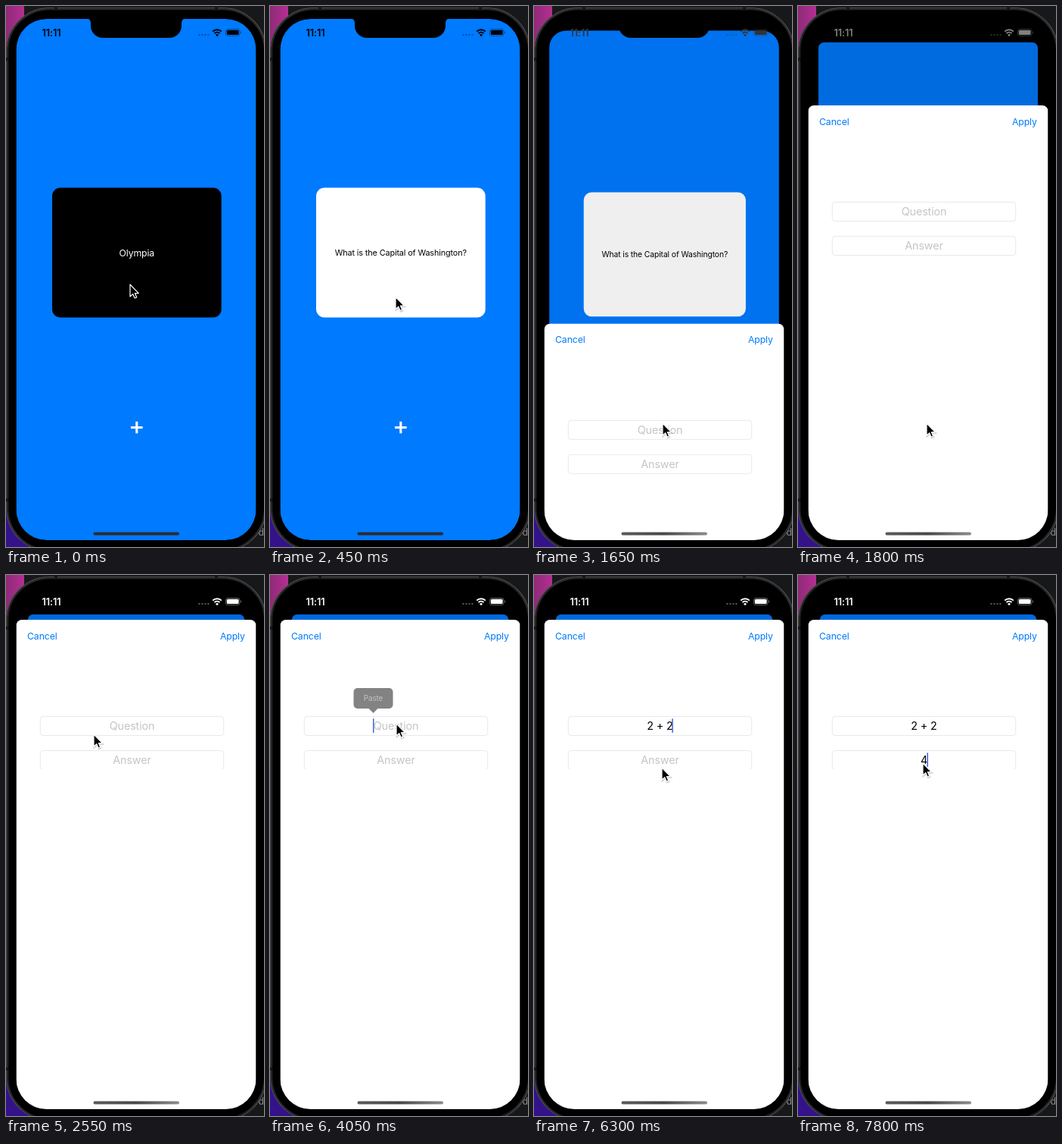
Write an HTML page that moves like this. It is 341 px wide and 713 px high and loops after 8000 ms.

```html
<!DOCTYPE html>
<html lang="en">
<head>
<meta charset="utf-8">
<title>Flash card app</title>
<style>
  html, body { margin: 0; width: 100%; height: 100%; overflow: hidden; background: #17181a; }
  svg { display: block; width: 100vw; height: 100vh; }
  text { font-family: Inter, Roboto, sans-serif; letter-spacing: -.01em; white-space: pre; }
  .mid { text-anchor: middle; }
  .nav { font-size: 12.3px; fill: #007aff; }
  .input { font-size: 14.4px; text-anchor: middle; }
  .field { fill: #fff; stroke: #e4e4e5; stroke-width: .8; }
  .caret { fill: #3f62dd; }
</style>
</head>
<body>
<svg viewBox="0 0 341 713" preserveAspectRatio="none">
  <defs>
    <clipPath id="screen"><rect x="13.5" y="17" width="317" height="687" rx="40"/></clipPath>
    <linearGradient id="magenta" x2="1" y2="0">
      <stop stop-color="#8f2a78"/><stop offset="1" stop-color="#b52f92"/>
    </linearGradient>
    <linearGradient id="barLight">
      <stop stop-color="#5a5a5a"/><stop offset=".5" stop-color="#484848"/><stop offset="1" stop-color="#8c8c8c"/>
    </linearGradient>
    <path id="arrow" d="M0 0V16L3.7 12.6 6.1 18 8.7 16.9 6.4 11.6H11.3Z"/>
  </defs>

  <!-- desktop -->
  <rect width="341" height="713" fill="#17181a"/>
  <rect width="24" height="90" fill="url(#magenta)"/>
  <rect y="630" width="60" height="83" fill="#34128a"/>
  <text x="333.5" y="698" font-size="12.5" fill="#8b8b8d">d</text>

  <!-- phone body -->
  <rect x=".6" y="2.6" width="343" height="716" rx="57" fill="#000" stroke="#4d4d4f" stroke-width="1.3"/>
  <rect x="2.4" y="4.4" width="339.4" height="712.4" rx="55" fill="none" stroke="#2b2b2c" stroke-width="1.6"/>
  <path d="M0 70h3M0 651h3M66 2v4M278 2v4" stroke="#161617" stroke-width="4"/>

  <g clip-path="url(#screen)">
    <g id="view">
      <rect class="page" x="13.5" y="17" width="317" height="687" fill="#007aff"/>
      <rect id="card" x="61" y="239.5" width="223.7" height="171" rx="11"/>
      <text id="cardText" class="mid" x="172.8"></text>
      <path d="M165 555.5h15.6M172.8 547.7v15.6" stroke="#fff" stroke-width="3.1"/>
      <rect id="dim" class="page" x="13.5" y="17" width="317" height="687"/>
    </g>
    <g id="sheet">
      <rect x="13.5" width="317" height="720" rx="7.5" fill="#fff"/>
      <text class="nav" x="28" y="25.5">Cancel</text>
      <text class="nav" x="315.8" y="25.5" text-anchor="end">Apply</text>
      <rect class="field" x="45.3" y="127.5" width="242.4" height="25" rx="3.7"/>
      <rect class="field" x="45.3" y="172.5" width="242.4" height="25" rx="3.7"/>
      <rect id="cover" x="44" y="197" width="246" height="2" fill="#fff"/>
      <text id="question" class="input" x="166.5" y="145.2"></text>
      <text id="answer" class="input" x="166.5" y="190.2"></text>
      <rect id="questionCaret" class="caret" y="130.3" width="1.5" height="18.6"/>
      <rect id="answerCaret" class="caret" y="175.3" width="1.5" height="18.6"/>
      <g id="paste">
        <path d="M115.5 90h42a5 5 0 0 1 5 5v17a5 5 0 0 1-5 5h-15l-6 6-6-6h-15a5 5 0 0 1-5-5V95a5 5 0 0 1 5-5z" fill="#262626"/>
        <text class="mid" x="136.5" y="107" font-size="9.9" fill="#fff" opacity=".5">Paste</text>
      </g>
    </g>
    <rect id="homeBar" x="115.5" y="693.6" width="113.5" height="4" rx="2"/>
  </g>

  <path d="M106 16.5q6 0 6 6v3.500a16 16 0 0 0 16 16h88a16 16 0 0 0 16-16v-3.500q0-6 6-6z" fill="#000"/>

  <g id="status">
    <text class="mid" x="60" y="39.5" font-size="12.7" font-weight="600">11:11</text>
    <path d="M255.400 38h.01M259.400 38h.01M263.400 38h.01M267.400 38h.01" stroke="currentColor" stroke-width="2.4" stroke-linecap="round" opacity=".32"/>
    <path d="M273.200 33.600a8.200 8.200 0 0 1 11.600 0M275.400 36.200a5.100 5.100 0 0 1 7.200 0" fill="none" stroke="currentColor" stroke-width="1.9"/>
    <path d="M277 38l2 2.200 2-2.200a2.800 2.800 0 0 0-4 0z"/>
    <rect x="290.400" y="30.400" width="18.600" height="9" rx="2.700" fill="none" stroke="currentColor" stroke-width=".8" opacity=".45"/>
    <rect x="291.800" y="31.800" width="15.800" height="6.200" rx="1.500"/>
    <path d="M310 33.300a2 2 0 0 1 0 3.200z" opacity=".5"/>
  </g>

  <g id="cursor">
    <use href="#arrow" x=".6" y="1.200" stroke="#000" stroke-width="2" opacity=".18"/>
    <use href="#arrow" stroke="#fff" stroke-width="1.200" stroke-linejoin="round"/>
  </g>
</svg>

<script>
const LOOP = 8000, STEP = 150;
const $ = id => document.getElementById(id);
const clamp = v => Math.max(0, Math.min(1, v));
const set = (el, attrs) => { for (const k in attrs) el.setAttribute(k, attrs[k]); };

// time, x, y of the pointer tip
const pointer = [
  [300, 164, 367], [600, 168, 400], [900, 177, 500], [1200, 177, 556], [1350, 170, 550],
  [1800, 170, 550], [2100, 145, 400], [2400, 116, 236], [2550, 116, 210], [2700, 114, 200],
  [2850, 118, 198], [3150, 118, 198], [3300, 130, 197], [3450, 155, 193], [3600, 167, 196],
  [6150, 167, 196], [6300, 169, 254], [6450, 170, 308], [6600, 170, 288], [6750, 168, 256],
  [6900, 165, 248]
];

// time, text, caret x (0 hides it)
const questionSteps = [
  [0, "", 0], [3750, "", 136], [4350, "2", 171], [4800, "2", 174], [5100, "2 +", 176.7],
  [5550, "2 +", 180.7], [5850, "2 + 2", 182.3], [6900, "2 + 2", 0]
];
const answerSteps = [[0, "", 0], [7050, "", 140.800], [7650, "4", 170.500]];

function along(points, t) {
  const i = points.findIndex(p => p[0] > t);
  if (i < 0) return points[points.length - 1].slice(1);
  if (i === 0) return points[0].slice(1);
  const a = points[i - 1], b = points[i], k = (t - a[0]) / (b[0] - a[0]);
  return [a[1] + (b[1] - a[1]) * k, a[2] + (b[2] - a[2]) * k];
}

// critically damped spring
function spring(t, start, speed) {
  const w = Math.max(0, t - start) / 1000 * speed;
  return t >= start + 850 ? 1 : 1 - (1 + w) * Math.exp(-w);
}

function drawField(id, placeholder, steps, t) {
  const [, value, caret] = steps.filter(s => s[0] <= t).pop();
  $(id).textContent = value || placeholder;
  set($(id), { fill: value ? "#000" : "#c5c5c7" });
  set($(id + "Caret"), { x: caret, opacity: caret ? 1 : 0 });
}

function drawCard(flipped) {
  set($("card"), { fill: flipped ? "#fff" : "#000" });
  $("cardText").textContent = flipped ? "What is the Capital of Washington?" : "Olympia";
  set($("cardText"), {
    fill: flipped ? "#000" : "#fff",
    "font-size": flipped ? 10.8 : 12.3,
    y: flipped ? 329 : 329.5
  });
}

function draw(t) {
  drawCard(t >= 150);

  const p = spring(t, 1550, 15), scale = 1 - .096 * p;
  set($("view"), { transform: `translate(172 ${17 + 35 * p}) scale(${scale}) translate(-172 -17)` });
  document.querySelectorAll(".page").forEach(el => set(el, { rx: Math.max(8, 40 - 38 * p) }));
  set($("dim"), { opacity: .14 * p });
  set($("sheet"), { transform: `translate(0 ${59 + 645 * (1 - p)})` });
  set($("cover"), { opacity: p === 1 ? 1 : 0 });
  set($("homeBar"), { fill: p > .1 ? "url(#barLight)" : "#2b2d31" });

  const grey = Math.round(255 * clamp((t - 1550) / 500));
  const tint = `rgb(${grey},${grey},${grey})`;
  set($("status"), { fill: tint, color: tint });

  drawField("question", "Question", questionSteps, t);
  drawField("answer", "Answer", answerSteps, t);
  const fade = Math.min(clamp((t - 3965) / 150), clamp((4500 - t) / 260));
  set($("paste"), { opacity: fade });

  set($("cursor"), { transform: `translate(${along(pointer, t).join(" ")})` });
}

function frame(now) {
  const t = now % LOOP;
  draw(Math.min(7800, Math.floor(t / STEP) * STEP));
  requestAnimationFrame(frame);
}
draw(0);
requestAnimationFrame(frame);
</script>
</body>
</html>
```
